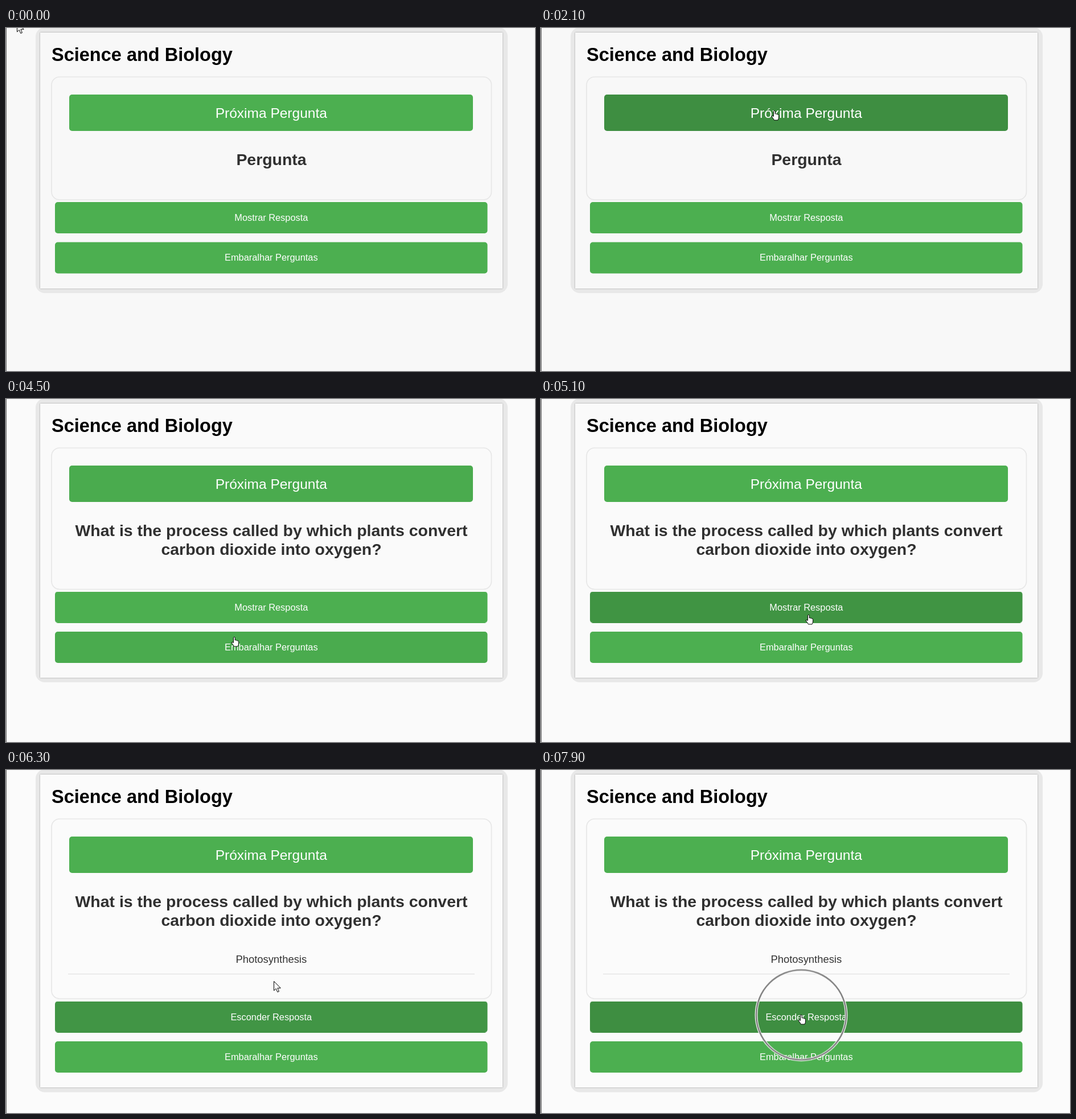
An HTML page that plays this animation: 929 px wide and 603 px high, repeating every 8000 ms.

```html
<!DOCTYPE html>
<html lang="en">
<head>
<meta charset="utf-8">
<title>Quiz</title>
<style>
html, body { margin: 0; width: 100%; height: 100%; overflow: hidden; background: #f8f8f8; }
svg { display: block; width: 929px; height: 603px; font-family: Arial, "Liberation Sans", sans-serif; }
text { text-anchor: middle; fill: #fff; font-size: 16.35px; }
.title { text-anchor: start; fill: #000; font-weight: bold; font-size: 32.5px; }
.question { fill: #303030; font-weight: bold; font-size: 28.45px; }
.answer { fill: #333; font-size: 18.4px; }
.next-label { font-size: 24.5px; }
.btn { fill: #4caf50; }
.frame { fill: #e8e8e8; height: 467px; }
.page { height: 450px; filter: drop-shadow(0 0 1px rgba(0,0,0,.38)); }
.card { stroke: #e7e7e7; stroke-width: 1.7px; height: 216px; }
.tip { fill: #fff; stroke: #000; stroke-width: 1px; }
.ring { fill: none; stroke: #808080; stroke-width: 2.6px; }
.halo { stroke: #fff; stroke-width: 4.8px; }

/* one 8 s clock, changes on the 100 ms grid: 1.25% = 100 ms */
svg * { animation: 8s step-end infinite; }
.bg { animation-name: bg; }
.frame { animation-name: frame; }
.page { animation-name: page, bg; }
.card { animation-name: card, bg; }
.lower { animation-name: lower; }
.ask { animation-name: ask; }
.asked { animation-name: asked; }
.shut { animation-name: shut; }
.open { animation-name: open; }
.next { animation-name: next; }
.show { animation-name: show; }
.shuffle { animation-name: shuffle; }
.cursor { animation-name: move; }
.arrow { animation-name: arrow; }
.hand { animation-name: hand; }
.sonar { animation-name: sonar; }
.ring { animation-name: ring; }

@keyframes bg { 0% { fill: #f8f8f8 } 35% { fill: #fafafa } 78.75%, to { fill: #fbfbfb } }
@keyframes frame { 0% { height: 467px } 35% { height: 499px } 78.75%, to { height: 567.5px } }
@keyframes page { 0% { height: 450px } 35% { height: 482px } 78.75%, to { height: 550px } }
@keyframes card { 0% { height: 216px } 35% { height: 248.5px } 78.75%, to { height: 316px } }
@keyframes lower {
  0% { transform: none } 35% { transform: translateY(32.5px) } 78.75%, to { transform: translateY(100.5px) }
}
@keyframes ask { 0% { opacity: 1 } 35%, to { opacity: 0 } }
@keyframes asked { 0% { opacity: 0 } 35%, to { opacity: 1 } }
@keyframes shut { 0% { opacity: 1 } 78.75%, to { opacity: 0 } }
@keyframes open { 0% { opacity: 0 } 78.75%, to { opacity: 1 } }

@keyframes next {
  0% { fill: #4caf50 }
  7.5% { fill: #4aa94d } 8.75% { fill: #459f48 } 10% { fill: #409443 } 11.25% { fill: #3e8e41 }
  55% { fill: #459f48 } 56.25% { fill: #4aab4e } 57.5%, to { fill: #4caf50 }
}
@keyframes show {
  0% { fill: #4caf50 }
  61.25% { fill: #4aab4e } 62.5% { fill: #459f48 } 63.75% { fill: #409443 } 65% { fill: #3e8e41 }
  78.75% { fill: #419545 } 80% { fill: #48a54b } 81.25% { fill: #4caf50 }
  91.25% { fill: #4aab4e } 92.5% { fill: #429846 } 93.75%, to { fill: #3e8e41 }
}
@keyframes shuffle {
  0% { fill: #4caf50 }
  56.25% { fill: #4aab4e } 57.5% { fill: #459f48 } 58.75% { fill: #409443 } 60% { fill: #3e8e41 }
  61.25% { fill: #449c47 } 62.5% { fill: #4aab4e } 63.75%, to { fill: #4caf50 }
}

@keyframes arrow { 0% { opacity: 1 } 7.5% { opacity: 0 } 55% { opacity: 1 } 56.25% { opacity: 0 } 78.75% { opacity: 1 } 91.25%, to { opacity: 0 } }
@keyframes hand { 0% { opacity: 0 } 7.5% { opacity: 1 } 55% { opacity: 0 } 56.25% { opacity: 1 } 78.75% { opacity: 0 } 91.25%, to { opacity: 1 } }

@keyframes move {
  0% { transform: translate(19px, -10px) }
  2.5% { transform: translate(32px, 4px) }
  3.75% { transform: translate(85px, 32px) }
  5% { transform: translate(160px, 66px) }
  6.25% { transform: translate(238px, 100px) }
  7.5% { transform: translate(306px, 128px) }
  8.75% { transform: translate(352px, 145px) }
  10% { transform: translate(382px, 153px) }
  11.25% { transform: translate(396px, 156px) }
  12.5% { transform: translate(401px, 156px) }
  13.75% { transform: translate(405px, 156px) }
  16.25% { transform: translate(330px, 146px) }
  17.5% { transform: translate(246px, 126px) }
  20% { transform: translate(262px, 120px) }
  21.25% { transform: translate(300px, 118px) }
  22.5% { transform: translate(345px, 122px) }
  23.75% { transform: translate(380px, 132px) }
  25% { transform: translate(402px, 141px) }
  26.25% { transform: translate(410px, 145px) }
  55% { transform: translate(406px, 290px) }
  56.25% { transform: translate(401px, 418px) }
  57.5% { transform: translate(406px, 450px) }
  58.75% { transform: translate(424px, 459px) }
  60% { transform: translate(446px, 436px) }
  61.25% { transform: translate(462px, 391px) }
  62.5% { transform: translate(468px, 384px) }
  63.75% { transform: translate(470px, 379px) }
  65% { transform: translate(470px, 374px) }
  66.25% { transform: translate(470px, 371px) }
  83.75% { transform: translate(472px, 345px) }
  85% { transform: translate(466px, 312px) }
  86.25% { transform: translate(458px, 295px) }
  87.5% { transform: translate(455px, 298px) }
  90% { transform: translate(455px, 338px) }
  91.25% { transform: translate(456px, 408px) }
  92.5% { transform: translate(457px, 427px) }
  93.75%, to { transform: translate(457px, 430px) }
}

@keyframes sonar {
  0% { opacity: 0; transform: translate(472px, 369px) }
  70% { opacity: 1; transform: translate(472px, 369px) }
  75% { opacity: 0; transform: translate(457px, 430.5px) }
  98.75%, to { opacity: 1; transform: translate(457px, 430.5px) }
}
@keyframes ring { 0% { r: 65px } 72.5% { r: 43px } 73.75% { r: 20px } 75%, to { r: 79px } }
</style>
</head>
<body>
<svg viewBox="0 0 929 603">
  <rect class="bg" width="929" height="603"/>
  <rect x="0" width="1" height="603" fill="#6a6a6a"/>

  <rect class="frame" x="52" y="-1" width="829" rx="16"/>
  <rect class="page" x="60" y="8" width="812"/>
  <text class="title" x="80" y="58">Science and Biology</text>

  <rect class="card" x="80" y="86" width="772.5" rx="14"/>
  <rect class="btn next" x="111" y="117" width="709" height="64" rx="5"/>
  <text class="next-label" x="465.8" y="158">Próxima Pergunta</text>

  <text class="question ask" x="466" y="241">Pergunta</text>
  <g class="asked">
    <text class="question" x="466" y="241">What is the process called by which plants convert</text>
    <text class="question" x="466" y="273.5">carbon dioxide into oxygen?</text>
  </g>
  <g class="open">
    <text class="answer" x="465.8" y="338.5">Photosynthesis</text>
    <rect x="109" y="358" width="714" height="1.3" fill="#e3e3e3"/>
  </g>

  <g class="lower">
    <rect class="btn show" x="86" y="306" width="759.5" height="55" rx="5"/>
    <text class="shut" x="465.8" y="339.3">Mostrar Resposta</text>
    <text class="open" x="465.8" y="339">Esconder Resposta</text>
    <rect class="btn shuffle" x="86" y="376.5" width="759.5" height="55" rx="5"/>
    <text x="465.8" y="409.3">Embaralhar Perguntas</text>
  </g>

  <g class="sonar">
    <circle class="ring halo"/>
    <circle class="ring"/>
  </g>

  <g class="cursor">
    <path class="tip arrow" d="M.5.5V16.8L4.2 13.3 6.8 19.4 9.4 18.3 6.9 12.3H12.2Z"/>
    <path class="tip hand" d="M-1.6 10.5V1.8Q-1.6.5-.2.5T1.2 1.8V6Q2.6 5.3 3.6 6.4 5 5.9 5.6 7 7.6 6.9 7.6 8.6V12Q7.4 14.5 6 17H-.6Q-1.4 14.8-3.2 13-5 11-4.8 9.8-3 9-1.6 10.5Z"/>
  </g>
</svg>
</body>
</html>
```
